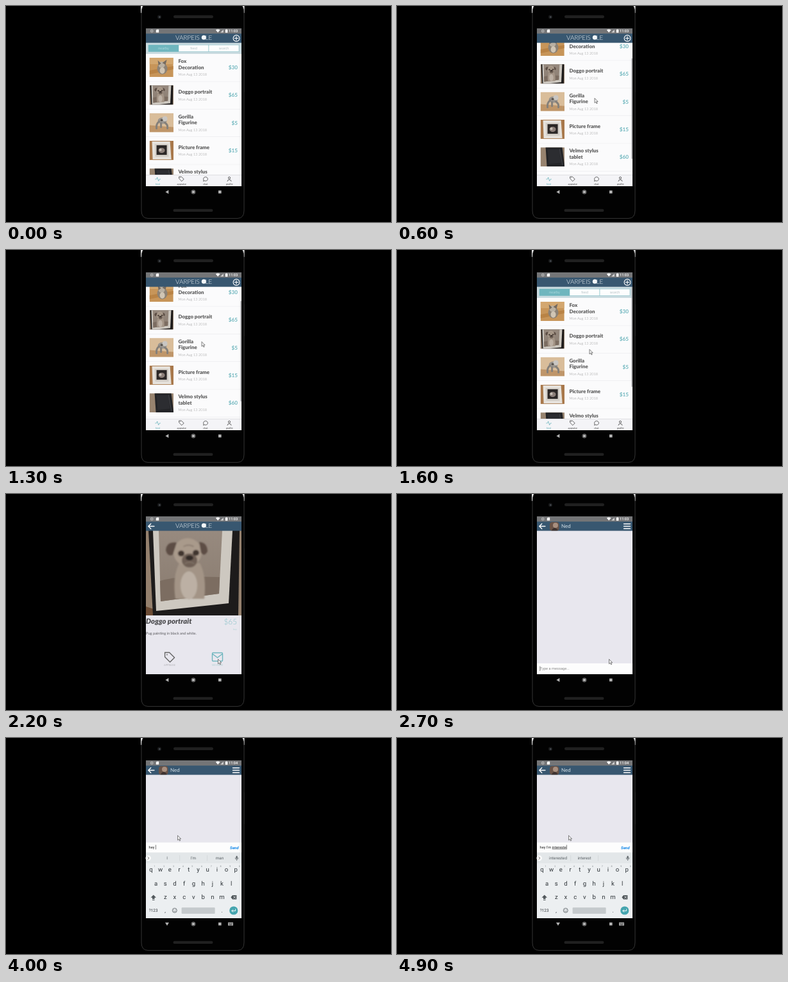
These frames come from a looping animation (600 px wide and 338 px high, 5 s). An HTML page:

```html
<!DOCTYPE html>
<html lang="en">
<head>
<meta charset="utf-8">
<title>Marketplace app demo</title>
<style>
  html, body { margin: 0; width: 100%; height: 100%; overflow: hidden; background: #000; }
  svg { display: block; }
  #stage { width: 100vw; height: 100vh; }
  text { text-rendering: geometricPrecision; white-space: pre; font-family: Lato, sans-serif; }
  .r { font-family: Roboto, sans-serif; }
  .l { fill: none; stroke-linecap: round; stroke-linejoin: round; }
</style>
</head>
<body>
<svg id="stage" viewBox="0 0 600 338"></svg>
<script>
const TEAL = '#6fb6be', BLUE = '#385770', PALE = '#e8e7ee';

const rect = (x, y, w, h, fill, extra = '') =>
  `<rect x="${x}" y="${y}" width="${w}" height="${h}" fill="${fill}" ${extra}/>`;
const oval = (x, y, rx, ry, fill, extra = '') =>
  `<ellipse cx="${x}" cy="${y}" rx="${rx}" ry="${ry}" fill="${fill}" ${extra}/>`;
const path = (d, fill, extra = '') => `<path d="${d}" fill="${fill}" ${extra}/>`;
const line = (d, color, w = 1) =>
  `<path class="l" d="${d}" stroke="${color}" stroke-width="${w}"/>`;
const text = (s, x, y, size, fill, extra = '') =>
  `<text x="${x}" y="${y}" font-size="${size}" fill="${fill}" ${extra}>${s}</text>`;
const group = (body, attrs = '') => `<g ${attrs}>${body}</g>`;
const at = (x, y, body, scale = 1) =>
  group(body, `transform="translate(${x} ${y}) scale(${scale})"`);
const MID = 'text-anchor="middle"', END = 'text-anchor="end"';

// Icons around their own centre
const tagIcon = (c, w) =>
  line('M-7 -7H0L8 1L1 8L-7 0Z', c, w) + oval(-3.6, -3.6, .9, .9, c);
const mailIcon = (c, w) =>
  line('M-7 -6.5H7Q8 -6.5 8 -5V5Q8 6.5 7 6.5H-7Q-8 6.5 -8 5V-5Q-8 -6.5 -7 -6.5Z M-8 -5L0 1L8 -5', c, w);
const backArrow = line('M231 50.5H221.8M225.8 46.5L221.8 50.5L225.8 54.5', '#fff', 1.3);

// Framed dog painting, used large and as a small picture
const pug =
  path('M264 164Q259 130 270 108L302 108Q313 128 309 164Z', '#a39486') +
  oval(285, 143, 13, 22, '#bcb0a4') +
  oval(283, 91, 22, 22, '#a99a8b') +
  path('M266 76Q250 74 249 88Q252 99 260 95Z', '#5d4e45') +
  path('M301 75Q314 76 314 90Q309 99 304 92Z', '#5d4e45') +
  oval(286, 104, 12, 11, '#6e5f55') + oval(286, 100, 6, 4, '#332a26') +
  oval(273, 93, 5, 4.5, '#40352f') + oval(296, 92, 5, 4.5, '#40352f') +
  line('M277 82Q284 78 292 82M279 109Q286 104 293 109', '#84766a', 1.4);

const portrait = rect(218, 57, 149, 133, '#94806d') +
  path('M218 176L230 180V190H218Z', '#6c4c35') +
  path('M222 57H364L362 190H229Z', '#1d1b1b') +
  path('M229 57H353L347 171L234 183Z', '#cdc8c0') +
  path('M238 57H337L332 156L241 168Z', 'url(#paint)') +
  path('M240 136Q265 128 333 130L332 156L241 168Z', '#7c6d61') +
  group(pug, 'filter="url(#soft)"');

// Small pictures, 37 by 30
const pics = [
  rect(0, 0, 37, 30, '#c79559') + rect(0, 0, 37, 10, '#d3a76f') +
    path('M0 20L37 13V18L0 26Z', '#b98345') +
    oval(20, 17, 8, 9, '#8c8276') + oval(19, 11, 5, 5, '#b9b0a2') +
    path('M13 4L18 9L14 12ZM27 3L25 11L20 8Z', '#756b60') + oval(20, 20, 4, 5, '#d0c5b4'),
  at(-54.7, -15, portrait, .251),
  rect(0, 0, 37.4, 30, '#d9bd9a') + path('M0 19L37.4 22V30H0Z', '#bf966a') +
    oval(20, 12, 7, 5, '#99948e') + oval(24, 9, 4, 4, '#c9c6c2') +
    line('M15 13Q10 17 11 24M24 15Q29 18 28 24M18 16L18 22', '#85807a', 3) + oval(19, 11, 2, 1.6, '#55504c'),
  rect(0, 0, 37.4, 30, '#a8784b') + path('M4 1H32L34 29H5Z', '#e6e2dc') +
    path('M8 5H29L30 25H9Z', '#d3cec7') + rect(11, 7, 16, 15, '#2b2726') +
    oval(19, 15, 5, 4, '#8c7f79') + oval(17, 14, 2, 2, '#c9c1b8'),
  rect(0, 0, 37.4, 30, '#97836f') + path('M8 0H34L37.4 28V30H10Z', '#232427') +
    path('M11 3H30L32 24L13 26Z', '#2c2d31') + line('M30 3L34 27', '#4c4d52', .8),
  rect(0, 0, 37.4, 30, '#77604f') + path('M0 0H37.4V6L0 11Z', '#a09184') +
    path('M4 12Q8 3 15 6L27 10Q34 13 33 23Q30 30 25 22L15 19Q8 31 4 25Z', '#303a45') +
    oval(12, 11, 3, 3, '#536170') + oval(24, 16, 3, 3, '#1d242c') + oval(28, 14, 1, 1, '#8696a0')
];

const items = [
  ['Fox|Decoration', 30], ['Doggo portrait', 65], ['Gorilla|Figurine', 5],
  ['Picture frame', 15], ['Velmo stylus|tablet', 60], ['Zeko 450|controller', 50]
];

function row([name, price], i) {
  const y = 96 + 43.3 * i, lines = name.split('|'), two = lines.length > 1;
  const title = lines.map((s, k) =>
    text(s, 268.4, y + (two ? -6.8 + 9.6 * k : -2.2), 7.95, '#5c5c5c', 'font-weight="900"')).join('');
  return rect(218, y + 21.8, 149, .6, '#eaeaed') +
    at(223.6, y - 15, `<svg width="37.4" height="30">${pics[i]}</svg>`) + title +
    text('Mon Aug 13 2018', 268.4, y + (two ? 13.1 : 8.5), 5.6, '#8c8c8c', 'font-weight="300"') +
    text('$' + price, 361, y + 3, 8.2, TEAL, `font-weight="700" ${END}`);
}

const segments = ['nearby', 'feed', 'search'].map((s, i) =>
  rect(222 + 47 * i, 61, 47, 10.4, i ? '#fdfdfd' : TEAL, `stroke="${TEAL}" stroke-width=".5"`) +
  text(s, 245.5 + 47 * i, 68, 5.6, i ? '#80979f' : '#d9f2f4', `font-weight="300" ${MID}`)).join('');

const brand =
  text('VARPEIS', 264, 52.6, 9.9, '#f1f5f7', 'font-weight="300"') +
  oval(308.3, 49.3, 3.5, 3.5, '#f1f5f7') +
  text('LE', 321.3, 52.6, 9.9, '#f1f5f7', `font-weight="300" ${END}`);

const tabs = rect(218, 264, 149, 18, '#f4f4f7') + rect(218, 264, 149, .5, '#c9c9ce') +
  line('M232.8 271H234.5L235.7 268L237.7 274L239 271H240.5', TEAL, .8) +
  at(273.4, 270.5, tagIcon('#444', 1.7), .48) +
  line('M308.6 273.7L307.7 274.3L308 272.2A3.4 3.2 0 1 1 309.5 273.6Z', '#444', .8) +
  oval(348, 269, 1.6, 1.6, 'none', 'stroke="#444" stroke-width=".8"') +
  line('M345 274.2Q345 271.8 348 271.8Q351 271.8 351 274.2', '#444', .8) +
  ['feed', 'appraise', 'chat', 'profile'].map((s, i) =>
    text(s, 236.5 + 37.2 * i, 280, 3.9, i ? '#444' : TEAL, MID)).join('');

const listScreen = rect(218, 57, 149, 225, '#fbfbfc') +
  group(group(rect(218, 57, 149, 18, '#cadbe0') + segments + items.map(row).join(''), 'id="rows"'),
    'clip-path="url(#view)"') +
  rect(365.3, 57, 1.4, 157, '#a2a2a6', 'id="bar"') + tabs +
  rect(218, 43, 149, 14.6, BLUE) + brand +
  oval(359, 50.5, 4.9, 4.9, 'none', 'stroke="#fff" stroke-width="1.1"') +
  line('M356.2 50.5H361.8M359 47.7V53.3', '#fff', 1.1);

const detailScreen = rect(218, 57, 149, 225, PALE) + group(portrait, 'clip-path="url(#photo)"') +
  rect(218, 43, 149, 14.6, BLUE) + brand + backArrow +
  text('Doggo portrait', 218, 203, 11.3, '#4d4d50', 'font-weight="900" font-style="italic"') +
  text('$65', 360, 204.4, 11.8, '#84c0c7', `font-weight="300" ${END}`) +
  text('buy', 360, 213.4, 3.8, '#b4d4d8', END) +
  text('Pug painting in black and white.', 218, 220.2, 5.7, '#58585c') +
  at(254.6, 255, tagIcon('#666', 1.4)) + text('APPRAISE', 255, 269, 3.9, '#b0b0b4', MID) +
  at(329.5, 255, mailIcon(TEAL, 1.4)) + text('MESSAGE', 329.5, 269, 3.9, '#aed0d4', MID);

const chatScreen = rect(218, 57, 149, 225, PALE) + rect(218, 43, 149, 14.6, BLUE) + backArrow +
  rect(238, 44, 14.5, 13.4, '#6a5347', 'rx="4"') + oval(247, 49, 4, 4, '#a88f7f') +
  path('M241 57Q245 49 251 57Z', '#3d3230') +
  text('Ned', 256, 53.3, 8, '#d7e3ea') +
  line('M353.5 46.8H363.5M353.5 50.5H363.5M353.5 54.2H363.5', '#fff', 1.4) +
  group(rect(218, 265, 149, 17, '#fdfdfd') +
    text('Type a message...', 223, 275.3, 5.7, '#8b8b8b', 'class="r"') +
    rect(222.6, 269.5, .6, 7.5, '#333'), 'id="empty"');

// Keyboard
const keyText = (s, x, y, size = 9.6) => text(s, x, y, size, '#30363a', `class="r" ${MID}`);
const keyRow = (s, x, y) => [...s].map((c, i) => keyText(c, x + 14.7 * i, y)).join('');
const digits = [...'1234567890'].map((c, i) =>
  text(c, 231.6 + 14.7 * i, 202, 3.7, '#80878b', `class="r" ${MID}`)).join('');
const keyboard = rect(218, 163.5, 149, 16, '#fdfdfd') +
  `<text id="typed" class="r" x="222.6" y="172.6" font-size="5.7" fill="#222"></text>` +
  rect(0, 167.3, .6, 7, '#333', 'id="caret"') +
  text('Send', 349, 173.6, 6.1, '#0b84e8', 'id="send" class="r" font-weight="700" font-style="italic"') +
  rect(218, 179.4, 149, 102.6, '#eceff1') + rect(218, 179.4, 149, 16.6, '#e3e7e9') +
  oval(221.7, 188, 4.2, 4.2, '#fff') + line('M221 186L223 188L221 190', '#555', .8) +
  rect(270.6, 183.5, .5, 9, '#c6cbce') + rect(313, 183.5, .5, 9, '#c6cbce') +
  [251, 292, 333].map((x, i) =>
    text('', x, 190, 6.3, '#596064', `id="hint${i}" class="r" ${MID}`)).join('') +
  rect(358.5, 184.4, 2.2, 4.6, '#596064', 'rx="1.1"') +
  line('M357.2 187.5Q357.2 190.2 359.6 190.2Q362 190.2 362 187.5M359.6 190.2V191.6', '#596064', .7) +
  keyRow('qwertyuiop', 226, 209.2) + digits +
  keyRow('asdfghjkl', 233.6, 231) + keyRow('zxcvbnm', 248.3, 252.2) +
  path('M229.8 245.6L234 249.8H231.6V252H228V249.8H225.6Z', '#50575b') + rect(228, 253, 3.6, 1, '#50575b') +
  path('M350.4 249.2L353 246H359.3V252.4H353Z', '#50575b') +
  line('M354.6 247.7L357.6 250.7M357.6 247.7L354.6 250.7', '#eceff1', .8) +
  keyText('?123', 229.6, 272.3, 6.4) + keyText(',', 248, 272.5, 8.5) +
  oval(262.8, 269.8, 3.5, 3.5, 'none', 'stroke="#50575b" stroke-width=".8"') +
  oval(261.5, 268.8, .5, .6, '#50575b') + oval(264.1, 268.8, .5, .6, '#50575b') +
  line('M261 271Q262.8 272.8 264.6 271', '#50575b', .6) +
  rect(273.6, 265.2, 52, 9.8, '#c5cacd', 'rx="1"') + keyText('.', 336.5, 272.5, 8.5) +
  oval(354.8, 270, 6.6, 6.6, '#45a5af') +
  line('M357.6 267.8V270.5H352M353.8 268.6L351.9 270.5L353.8 272.4', '#fff', .9);

const status = rect(218, 35, 149, 8.2, '#747577') +
  oval(227.3, 39.2, 2, 2, 'none', 'stroke="#cfcfcf" stroke-width=".8"') + oval(227.3, 39.2, .7, .7, '#cfcfcf') +
  path('M235 36.8H238.2V41.6H233.8V38Z', '#fff') +
  path('M326.8 37.6Q330.2 35.4 333.6 37.6L330.2 41.6Z', '#fff') +
  path('M338.8 36.9V41.5H334.2Z', '#d5d5d5') +
  path('M342.6 36.5H344.6V37H345.4V41.7H341.8V37H342.6Z', '#fff') +
  text('', 361.2, 41.3, 5.6, '#fff', `id="clock" class="r" font-weight="500" ${END}`);

// Light corners show behind the rounded phone
const GREY = '#b4b4b4';
const phone = path('M210 0H215L212 11H210ZM371.6 0H366.6L369.8 11H371.6Z', '#e4e4e4') +
  path('M214 -1Q211 4 211 12V320Q211 332 221 332.4H361Q371 332 371 320V12Q371 4 368 -1Z', '#020202',
    'stroke="#3c3c3c" stroke-width=".9"') +
  rect(210, 90, 1.4, 115, '#191919') + rect(371, 85, 1, 50, '#232323') +
  rect(261, 14.5, 62, 4.4, '#202020', 'rx="2.2"') + rect(260.5, 317.8, 62, 4.2, '#202020', 'rx="2.1"') +
  oval(239, 17, 3.1, 3.1, '#171819') + oval(239.3, 17.2, 1.2, 1.2, '#4a5055');
const nav = path('M253.4 288V294L248.4 291Z', GREY, 'id="back"') +
  path('M248 288.8H254L251 293.8Z', GREY, 'id="down"') +
  oval(292, 291, 2.3, 2.3, GREY) + oval(292, 291, 3.2, 3.2, 'none', `stroke="${GREY}" stroke-width=".6"`) +
  rect(331, 288.7, 4.6, 4.6, GREY) +
  group(rect(346, 288.5, 8, 5, GREY, 'rx=".6"') +
    line('M347.3 290H352.8M347.3 291.2H352.8M348.6 292.5H351.4', '#111', .5), 'id="kbIcon"');

const stage = document.getElementById('stage');
stage.innerHTML = `<defs>
  <clipPath id="view">${rect(218, 57, 149, 207, '#000')}</clipPath>
  <clipPath id="photo">${rect(218, 57, 149, 133, '#000')}</clipPath>
  <filter id="soft"><feGaussianBlur stdDeviation="1.3"/></filter>
  <linearGradient id="paint" x2="0" y2="1"><stop stop-color="#978a7f"/><stop offset="1" stop-color="#8a7c70"/></linearGradient>
</defs>` + phone + group(listScreen, 'id="list"') + group(detailScreen, 'id="detail"') +
  group(chatScreen, 'id="chat"') + group(keyboard, 'id="keys"') + status + nav +
  path('M0 0V7.4L1.8 5.8L3 8.5L4.2 8L3 5.3H5.2Z', '#f4f4f4',
    'id="pointer" stroke="#444" stroke-width=".65" stroke-linejoin="round"');

const $ = id => document.getElementById(id);
const show = (id, on) => $(id).setAttribute('display', on ? 'inline' : 'none');

// Time, then values
const scrolls = [[400, 0], [800, 66], [1000, 66], [1300, 30], [1500, 0]];
const moves = [
  [100, 366, 208], [300, 312, 178], [400, 309, 177], [800, 307, 111.5], [1000, 307, 111.5],
  [1300, 305, 143.5], [1500, 304, 173], [1700, 296, 138], [1800, 296, 138], [2200, 330.5, 258.5],
  [2700, 330.5, 258.5], [3200, 284, 276.5], [3500, 284, 276.5], [3900, 267.5, 152.5]
];
const typing = [
  [3500, '', '', "I,The,I'm"], [3800, 'h', '', 'he,have,how'], [3900, 'hey', '', 'hey,they,head'],
  [4000, 'hey ', '', "I,I'm,man"], [4200, 'hey ', 'I', "I,I'm,I'll"], [4400, "hey ", "I'm", "I'm,I'm a,in"],
  [4500, "hey I'm ", '', 'not,in,so'], [4600, "hey I'm ", 'in', 'in,int,into'],
  [4700, "hey I'm ", 'inte', 'inter,interested,'], [4800, "hey I'm ", 'interes', 'interest,interested,'],
  [4900, "hey I'm ", 'intereste', 'interested,interest,']
];

function track(table, t) {
  const i = table.findIndex(k => k[0] > t);
  if (i === 0) return table[0].slice(1);
  if (i < 0) return table[table.length - 1].slice(1);
  const a = table[i - 1], b = table[i], p = (t - a[0]) / (b[0] - a[0]);
  const e = p * p * (3 - 2 * p);
  return a.slice(1).map((v, k) => v + (b[k + 1] - v) * e);
}

function drawTyping(t) {
  const [, done, word, hints] = typing.filter(k => k[0] <= t).pop();
  $('typed').innerHTML = `${done}<tspan text-decoration="underline">${word}</tspan>`;
  $('caret').setAttribute('x', 222.9 + $('typed').getComputedTextLength());
  hints.split(',').forEach((s, i) => { $('hint' + i).textContent = s; });
  show('send', done + word !== '');
}

function draw(ms) {
  const t = Math.floor((ms % 5000 + .5) / 100) * 100 % 5000;
  const [s] = track(scrolls, t), [x, y] = track(moves, t), open = t >= 3500;
  $('rows').setAttribute('transform', `translate(0 ${-s})`);
  $('bar').setAttribute('y', 57 + s * 207 / 273);
  show('bar', t >= 400);
  show('list', t < 1800);
  show('detail', t >= 1800 && t < 2700);
  show('chat', t >= 2700);
  show('empty', !open);
  for (const id of ['keys', 'down', 'kbIcon']) show(id, open);
  show('back', !open);
  if (open) drawTyping(t);
  $('clock').textContent = t < 3200 ? '11:03' : '11:04';
  show('pointer', t >= 100);
  $('pointer').setAttribute('transform', `translate(${x} ${y})`);
}

let start, last;
function tick(now) {
  start ??= now;
  const step = Math.floor((now - start + .5) / 100);
  if (step !== last) draw(now - start);
  last = step;
  requestAnimationFrame(tick);
}
draw(0);
requestAnimationFrame(tick);
</script>
</body>
</html>
```
